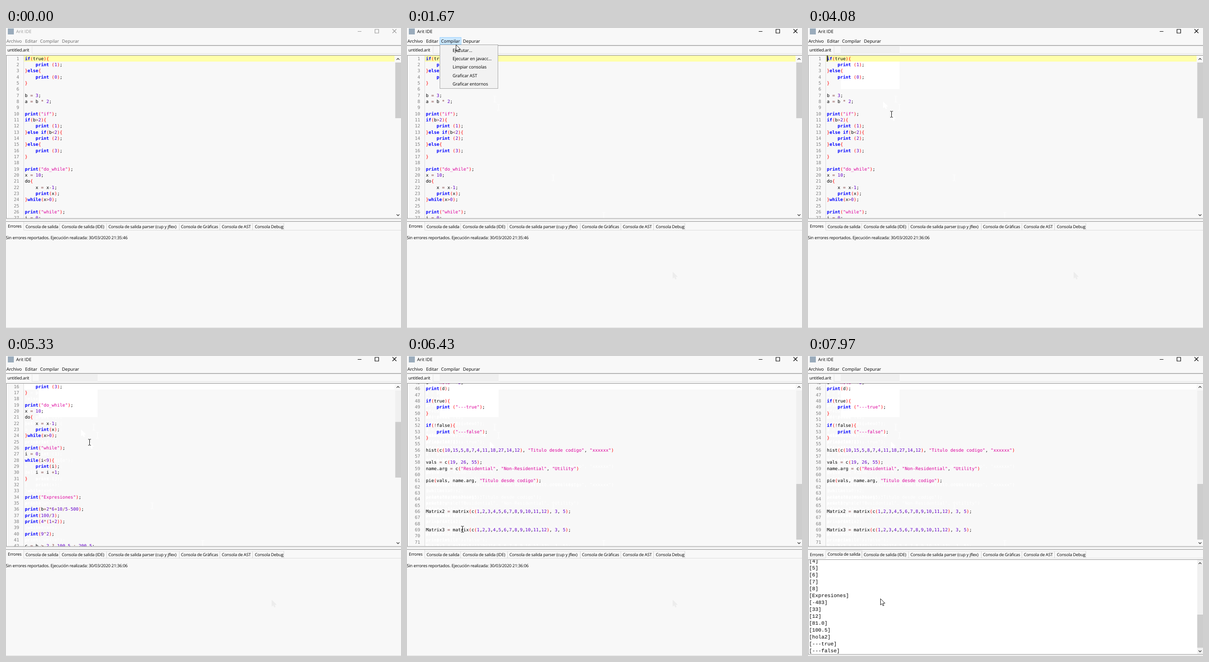
An HTML page that plays this animation: 858x652 px, repeating every 8 s.

```html
<!DOCTYPE html>
<html lang="es">
<head>
<meta charset="utf-8">
<title>Arit IDE</title>
<style>
  html, body { margin: 0; width: 100%; height: 100%; overflow: hidden; background: #f8f8f8; }
  svg { display: block; width: 858px; height: 652px; }
  text { text-rendering: geometricPrecision; white-space: pre; }
  .menu { font: 9.65px "Open Sans", "Noto Sans", sans-serif; }
  .item { letter-spacing: -.12px; }
  .ui { font: 9.17px "Open Sans", "Noto Sans", sans-serif; letter-spacing: -.195px; }
  .status { letter-spacing: -.15px; }
  .code { font: 9.69px "DejaVu Sans Mono", monospace; }
  .out { font: 11.11px "Liberation Mono", monospace; }
  .kw { font-weight: bold; fill: #00f; }
  .str { fill: #dc009c; }
  .num { fill: #6400c8; }
  .br { fill: #f00; }
  .op { fill: #804040; }
  #plain text { fill: #fff; }
</style>
</head>
<body>
<script>
const NS = 'http://www.w3.org/2000/svg';
const LOOP = 8000, ROW = 40 / 3, COL = 35 / 6;

function add(parent, tag, attrs = {}, text) {
  const el = document.createElementNS(NS, tag);
  for (const k in attrs) el.setAttribute(k, attrs[k]);
  if (text !== undefined) el.textContent = text;
  parent.append(el);
  return el;
}
const group = (p, attrs) => add(p, 'g', attrs);
const box = (p, x, y, width, height, fill, stroke = 'none') =>
  add(p, 'rect', { x, y, width, height, fill, stroke });
const label = (p, cls, x, y, text, fill = '#000') =>
  add(p, 'text', { class: cls, x, y, fill }, text);
const path = (p, d, stroke, fill = 'none', width = 1) =>
  add(p, 'path', { d, stroke, fill, 'stroke-width': width });
const show = (el, on) => { el.style.display = on ? '' : 'none'; };
const move = (el, x, y) => el.setAttribute('transform', `translate(${x} ${y})`);

const source = `if(true){
    print (1);
}else{
    print (0);
}

b = 3;
a = b * 2;

print("if");
if(b>2){
    print (1);
}else if(b<2){
    print (2);
}else{
    print (3);
}

print("do_while");
x = 10;
do{
    x = x-1;
    print(x);
}while(x>0);

print("while");
i = 0;
while(i<9){
    print(i);
    i = i +1;
}


print("Expresiones");

print(b+2*6+10/5-500);
print(100/3);
print(4*(1+2));

print(9^2);

c = b > 2 ? 100.5 : 200.5;
print(c);

d = "hola" +2;
print(d);

if(true){
    print ("---true");
}

if(!false){
    print ("---false");
}

hist(c(10,15,5,8,7,4,11,18,27,14,12), "Titulo desde codigo", "xxxxxx")

vals = c(19, 26, 55);
name.arg = c("Residential", "Non-Residential", "Utility")

pie(vals, name.arg, "Titulo desde codigo");




Matrix2 = matrix(c(1,2,3,4,5,6,7,8,9,10,11,12), 3, 5);


Matrix3 = matrix(c(1,2,3,4,5,6,7,8,9,10,11,12), 3, 5);

`.split('\n');

const count = n => [...Array(n).keys()];
const output = [1, 'if', 1, 'do_while', ...count(10).reverse(), 'while', ...count(9),
  'Expresiones', -483, 33, 12, '81.0', '100.5', 'hola2', '---true', '---false'];

const svg = add(document.body, 'svg', { viewBox: '0 0 858 652' });
const defs = add(svg, 'defs');
const clip = (id, x, y, w, h) => box(add(defs, 'clipPath', { id }), x, y, w, h);
clip('editor', 1, 60, 844, 354);
clip('console', 1, 443, 844, 205);
box(svg, 0, 0, 858, 652, '#f8f8f8');

// Title and menu bar
box(svg, 4, 1, 13, 13, '#9aabbb');
const compilarLit = box(svg, 71.5, 20.5, 46, 15, '#cce8ff', '#99d1ff');
const title = label(svg, 'menu', 22, 10.6, 'Arit IDE');
const menuBar = group(svg);
[['Archivo', 1], ['Editar', 41.5], ['Compilar', 74], ['Depurar', 121.5]]
  .forEach(([s, x]) => label(menuBar, 'menu', x, 31.8, s, null));
const controls = path(svg, 'M764 7.5h8M801.5 3h8v8h-8zM839.5 2.5l8.5 8.5M848 2.5l-8.5 8.5', '#000', 'none', 1.15);
box(svg, 0, 37, 858, 2, '#b4b4b4');

// Editor frame
label(svg, 'ui', 3, 50.8, 'untitled.arit');
path(svg, 'M56.5 40v16M57 55.5H858', '#e4e4e4');
const popupMark = group(svg);
box(popupMark, 71, 40, 128, 16, '#f0f0f0');
box(popupMark, 71, 60, 128, 73, '#fff');
const currentLine = box(svg, 39, 60, 805, 13, '#ffffaa');

// Faint marks left where the pointer has been
const ARROW = 'M0 0V13.5L3.2 10.6L5.3 15.4L7.5 14.5L5.4 9.8H9.7Z';
const IBEAM = 'M-3-6.5h2.2l.8.8.8-.8h2.2M0-5.7V5.7M-3 6.5h2.2l.8-.8.8.8h2.2';
const marks = [
  [280, ARROW, 577, 530, '#ededed'], [510, IBEAM, 427, 407], [590, IBEAM, 317, 325],
  [660, IBEAM, 198, 172], [820, IBEAM, 190, 154], [2680, ARROW, 163, 160], [4080, ARROW, 180, 186]
].map(([since, d, x, y, tone = '#fff']) => {
  const el = path(svg, d, tone, d === ARROW ? tone : 'none');
  move(el, x + .5, y + .5);
  return { since, el };
});

// Code, its line numbers and the pale traces of earlier scroll positions
const pane = group(svg, { 'clip-path': 'url(#editor)' });
const traces = group(pane);
const code = group(pane);
const plain = group(defs, { id: 'plain' });
const TOKEN = /"[^"]*"|\d+(?:\.\d+)?|[A-Za-z_][\w.]*|\S/g;
function kind(s) {
  if (/^(if|else|print|while)$/.test(s)) return 'kw';
  if (s[0] === '"') return 'str';
  if (/^\d/.test(s)) return 'num';
  if (/^[(){}]$/.test(s)) return 'br';
  return /^[=+\-*\/<>!?:^]$/.test(s) ? 'op' : '';
}
source.forEach((line, i) => {
  const y = 69.5 + i * ROW;
  add(code, 'text', { class: 'code', x: 28.6, y, fill: '#808080', 'text-anchor': 'end' }, i + 1);
  for (const m of line.matchAll(TOKEN)) {
    const attrs = { class: 'code ' + kind(m[0]), x: 41 + m.index * COL, y };
    add(code, 'text', attrs, m[0]);
    add(plain, 'text', attrs, m[0]);
  }
});
const caret = box(svg, 41, 60, 1.7, 13, '#000');
const scrolls = [[0, 0], [5240, 6], [5330, 15], [5880, 27], [5960, 39], [6030, 42], [6130, 44.63]];
const trail = scrolls.slice(0, -1).map(([, o], i) => ({
  since: scrolls[i + 1][0],
  el: add(traces, 'use', { href: '#plain', y: -o * ROW })
}));
path(svg, 'M38.5 60V413', '#dcdcdc');
path(svg, 'M858 59.5H.5V414H858', '#8c8c8c');

const chevron = (p, y, dir) => path(p, `M848.5 ${y + 1.5 * dir}l3 ${-3 * dir}l3 ${3 * dir}`, '#404040', 'none', 1.4);
const scrolled = box(svg, 845.5, 75, 12.5, 0, '#f0f0f0');
const thumb = box(svg, 845.5, 75, 12.5, 121, '#cdcdcd');
chevron(svg, 67.5, 1);
chevron(svg, 406.5, -1);

// Lower tabs
path(svg, 'M0 416.5H858', '#e8e8e8');
path(svg, 'M0 420.5H858', '#8c8c8c');
const tabLit = box(svg, 39, 424, 77, 15, '#d8e8f4');
const tabs = [['Errores', 4, 38], ['Consola de salida', 42.5, 116], ['Consola de salida (IDE)', 121, 218],
  ['Consola de salida parser (cup y jflex)', 222.5, 376], ['Consola de Gràficas', 380, 464],
  ['Consola de AST', 468.7, 535], ['Consola Debug', 540.5, 603]].map(([s, x, end]) => {
  path(svg, `M${end + .5} 424V439`, '#d4d4d4');
  return label(svg, 'ui', x, 435.3, s);
});
path(svg, 'M39 424.5H603', '#e6e6e6');
const errorView = group(svg);
path(errorView, 'M38.5 421V439.5H858', '#dcdcdc');
const status = label(errorView, 'ui status', -.5, 459.3, '');

const outView = group(svg);
box(outView, 0, 440, 858, 210, '#fff');
path(outView, 'M0 439.5H38.5V422.5H117.5V439.5H858', '#dcdcdc');
path(outView, 'M858 442.5H.5V648.5H858', '#8c8c8c');
box(outView, 845.5, 443, 12.5, 205, '#f0f0f0');
const outThumb = box(outView, 845.5, 457, 12.5, 72, '#cdcdcd');
chevron(outView, 450.5, 1);
chevron(outView, 641.5, -1);
const outText = group(group(outView, { 'clip-path': 'url(#console)' }));
output.forEach((v, i) => label(outText, 'out', 2.3, 454.2 + i * 15, `[${v}]`));
path(svg, 'M0 651.5H858', '#dcdcdc');

// Drop-down menu
const popup = group(svg);
box(popup, 71.5, 36.5, 126, 95, '#f2f2f2', '#a5a5a5');
const itemLit = box(popup, 73, 39, 123, 18, '#91c9f7');
['Ejecutar...', 'Ejecutar en javacc...', 'Limpiar consolas', 'Graficar AST', 'Graficar entornos']
  .forEach((s, i) => label(popup, 'menu item', 99, 51.8 + i * 18.33, s));

// Pointer
const pointer = group(svg);
const ring = add(pointer, 'circle', { r: 10, fill: '#ff0', 'fill-opacity': .47 });
const arrow = path(pointer, ARROW, '#000', '#fff', .9);
const beam = path(pointer, IBEAM, '#000');
const A = 1, I = 2;
const route = [
  [0, 0, 0, 0], [190, 577, 530, A], [280, 427, 407, I], [510, 317, 325, I], [590, 198, 172, I],
  [660, 190, 154, I], [820, 170, 118, I], [900, 146, 84, I], [970, 129, 56, A], [1140, 116, 44, A],
  [1220, 106, 34, A], [1670, 106, 36, A], [1750, 106, 41, A], [1830, 106, 45, A], [1910, 106, 48, A],
  [2440, 112, 62, A], [2520, 136, 112, A], [2600, 163, 160, A], [2680, 176, 180, A], [2750, 180, 186, A],
  [4080, 181, 187, I], [6210, 176, 210, I], [6280, 162, 262, I], [6360, 142, 322, I], [6430, 120, 376, I],
  [6510, 104, 416, A], [6580, 96, 431, A], [6660, 92, 438, A], [6810, 87, 438, A], [6960, 88, 434, A],
  [7040, 89, 431, A], [7500, 150, 470, A], [7580, 207, 515, A], [7650, 157, 527, A]
];

const at = (table, t) => table.findLast(step => step[0] <= t);
const within = (t, ...spans) => spans.some(([a, b]) => t >= a && t < b);

function draw(t) {
  const active = t >= 1290, open = within(t, [1370, 4080]), chosen = t >= 7190;
  title.setAttribute('fill', active ? '#000' : '#999');
  menuBar.setAttribute('fill', active ? '#000' : '#666');
  controls.setAttribute('stroke', active ? '#000' : '#999');
  show(compilarLit, within(t, [1220, 4080]));
  show(popup, open);
  show(itemLit, t >= 1750);
  show(popupMark, t >= 4080);
  show(caret, within(t, [4080, 4630], [5090, 5240]));

  const offset = at(scrolls, t)[1];
  move(code, 0, -offset * ROW);
  currentLine.setAttribute('fill', offset ? '#fff' : '#ffffaa');
  thumb.setAttribute('y', 75 + offset * 4.55);
  scrolled.setAttribute('height', offset * 4.55);
  for (const m of [...marks, ...trail]) show(m.el, t >= m.since);

  const [, x, y, shape] = at(route, t);
  move(pointer, x + .5, y + .5);
  show(arrow, shape === A);
  show(beam, shape === I);
  show(ring, within(t, [1290, 1520], [1980, 2160], [7190, 7270]));

  status.textContent = 'Sin errores reportados. Ejecución realizada: 30/03/2020 21:' + (t < 4080 ? '35:46' : '36:06');
  show(tabLit, !chosen && shape === A && within(y, [424, 440]));
  show(errorView, !chosen);
  show(outView, chosen);
  tabs[0].setAttribute('y', chosen ? 435.3 : 433.8);
  tabs[1].setAttribute('y', chosen ? 433.8 : 435.3);
  const end = t >= 7970;
  move(outText, 0, end ? -290.5 : 0);
  outThumb.setAttribute('y', end ? 562 : 457);
}

const start = performance.now();
function tick() {
  draw((performance.now() - start) % LOOP);
  requestAnimationFrame(tick);
}
tick();
</script>
</body>
</html>
```
